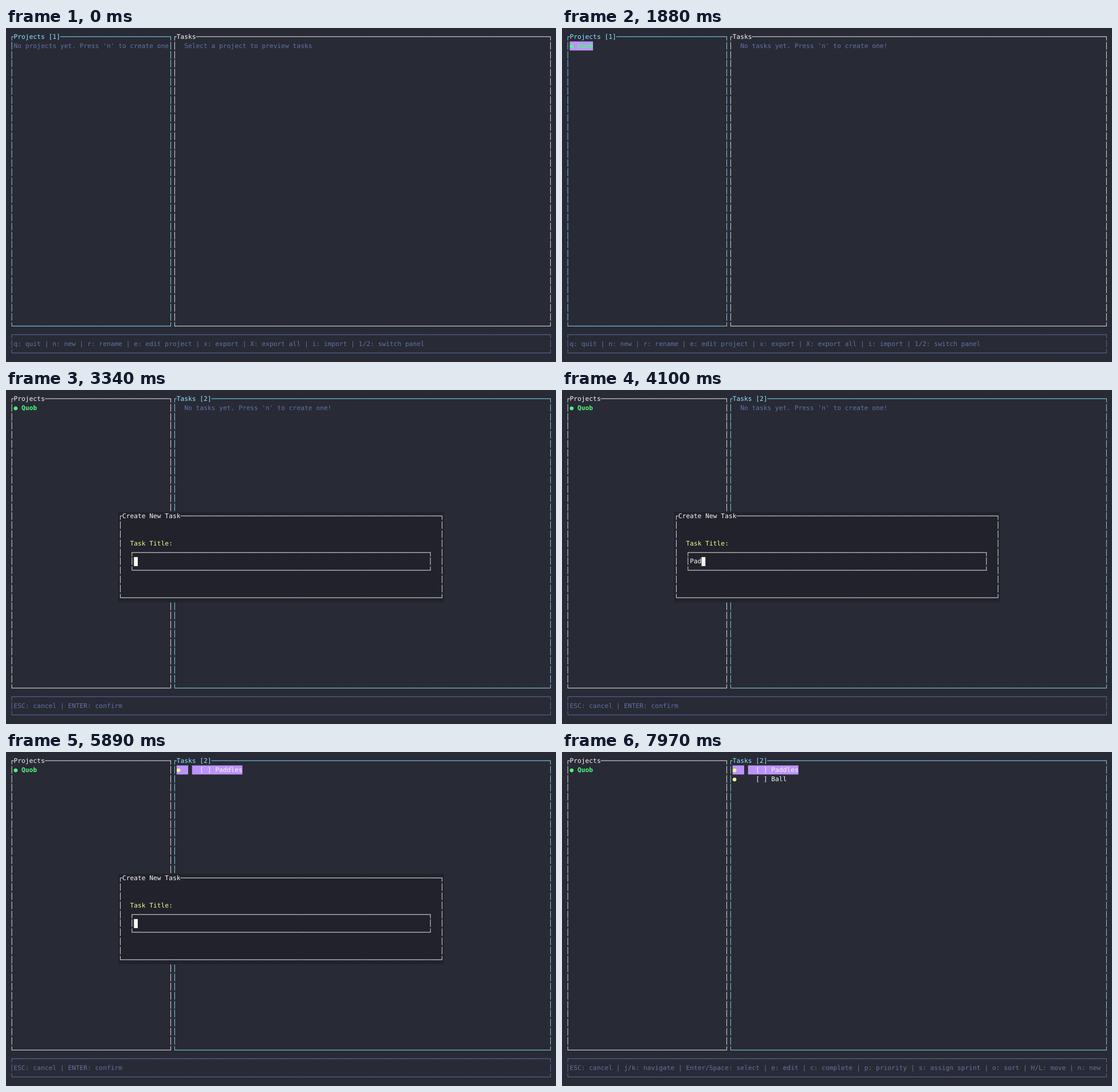
An HTML page with a canvas that plays this animation: 960 px wide and 584 px high, repeating every 8 s.

```html
<!DOCTYPE html>
<html lang="en">
<head>
<meta charset="utf-8">
<title>Task manager</title>
<style>
  html, body { margin: 0; width: 100%; height: 100%; overflow: hidden; background: #282a36; }
  canvas { display: block; }
</style>
</head>
<body>
<canvas id="stage" width="960" height="584"></canvas>
<script>
const ctx = document.getElementById('stage').getContext('2d');
const LOOP = 8000;
const CELL_W = 6.765, CELL_H = 15.8, TOP = 7.7, BASELINE = 11.3;
const BG = '#282a36', MODAL_BG = '#21222c', WHITE = '#f8f8f2', CYAN = '#8be9fd',
      MUTED = '#6272a4', GREEN = '#50fa7b', YELLOW = '#f1fa8c', PURPLE = '#bd93f9';

const KEYS_PROJECTS = 'q: quit | n: new | r: rename | e: edit project | x: export | X: export all | i: import | 1/2: switch panel';
const KEYS_TASKS = 'ESC: cancel | j/k: navigate | Enter/Space: select | e: edit | c: complete | p: priority | s: assign sprint | o: sort | H/L: move | n: new';
const KEYS_MODAL = 'ESC: cancel | ENTER: confirm';

// Dialogs: open and close times, text typed, and the time of each keystroke
const DIALOGS = [
  { open: 760, close: 1880, kind: 'Project', label: 'Project Name:', text: 'Quob',
    keys: [1260, 1520, 1610, 1700] },
  { open: 3340, close: 4780, kind: 'Task', label: 'Task Title:', text: 'Paddles',
    keys: [3810, 3990, 4100, 4310, 4420, 4560, 4630] },
  { open: 5890, close: 7500, kind: 'Task', label: 'Task Title:', text: 'Ball',
    keys: [6680, 6900, 7000, 7180] },
];
const [project, ...tasks] = DIALOGS;
const FOCUS_TASKS = 2480, MOVE_UP = 7970;

const colX = col => (col + 1) * CELL_W;
const rowY = row => TOP + row * CELL_H;

function fill(col, row, cols, rows, color) {
  ctx.fillStyle = color;
  ctx.fillRect(colX(col), rowY(row), cols * CELL_W, rows * CELL_H);
}

function print(col, row, text, color, weight = '') {
  ctx.font = `${weight} 11.2px "DejaVu Sans Mono", monospace`;
  ctx.fillStyle = color;
  [...text].forEach((ch, i) => {
    if (ch !== ' ') ctx.fillText(ch, colX(col + i), rowY(row) + BASELINE);
  });
}

function box(left, top, right, bottom, color, title = '') {
  const inner = right - left - 1;
  print(left, top, '┌' + title.padEnd(inner, '─') + '┐', color);
  for (let row = top + 1; row < bottom; row++) {
    print(left, row, '│', color);
    print(right, row, '│', color);
  }
  print(left, bottom, '└' + '─'.repeat(inner) + '┘', color);
}

function drawTask(row, name, selected) {
  if (selected) {
    fill(43, row, 3, 1, PURPLE);
    fill(47, row, 6 + name.length, 1, PURPLE);
  }
  print(43, row, '●', YELLOW);
  print(49, row, '[ ] ' + name, WHITE);
}

function drawDialog({ kind, label, text, keys }, t) {
  const typed = text.slice(0, keys.filter(k => t >= k).length);
  fill(28, 13, 84, 10, MODAL_BG);
  box(28, 13, 111, 22, WHITE, 'Create New ' + kind);
  print(31, 16, label, YELLOW);
  box(31, 17, 108, 19, WHITE);
  print(32, 18, typed, WHITE);
  fill(32 + typed.length, 18, 1, 1, WHITE);
}

function draw(t) {
  const dialog = DIALOGS.find(d => t >= d.open && t < d.close);
  const onTasks = t >= FOCUS_TASKS;
  const hasProject = t >= project.close;
  const added = tasks.filter(d => t >= d.close);

  ctx.fillStyle = BG;
  ctx.fillRect(0, 0, 960, 584);

  box(1 - 1, 0, 41, 32, onTasks ? WHITE : CYAN, onTasks ? 'Projects' : 'Projects [1]');
  if (hasProject) {
    if (!onTasks) fill(1, 1, 2 + project.text.length, 1, PURPLE);
    print(1, 1, '● ' + project.text, GREEN, 'bold');
  } else {
    print(1, 1, "No projects yet. Press 'n' to create one", MUTED);
  }

  box(42, 0, 139, 32, onTasks ? CYAN : WHITE, onTasks ? 'Tasks [2]' : 'Tasks');
  const selected = t >= MOVE_UP ? 0 : added.length - 1;
  added.forEach((task, i) => drawTask(1 + i, task.text, i === selected));
  if (!added.length) {
    print(45, 1, hasProject ? "No tasks yet. Press 'n' to create one!" : 'Select a project to preview tasks', MUTED);
  }

  box(0, 33, 139, 35, MUTED);
  print(1, 34, dialog ? KEYS_MODAL : onTasks ? KEYS_TASKS : KEYS_PROJECTS, MUTED);

  if (dialog) drawDialog(dialog, t);
}

ctx.textRendering = 'geometricPrecision';
const start = performance.now();
function tick() {
  draw((performance.now() - start) % LOOP);
  requestAnimationFrame(tick);
}
tick();
</script>
</body>
</html>
```
